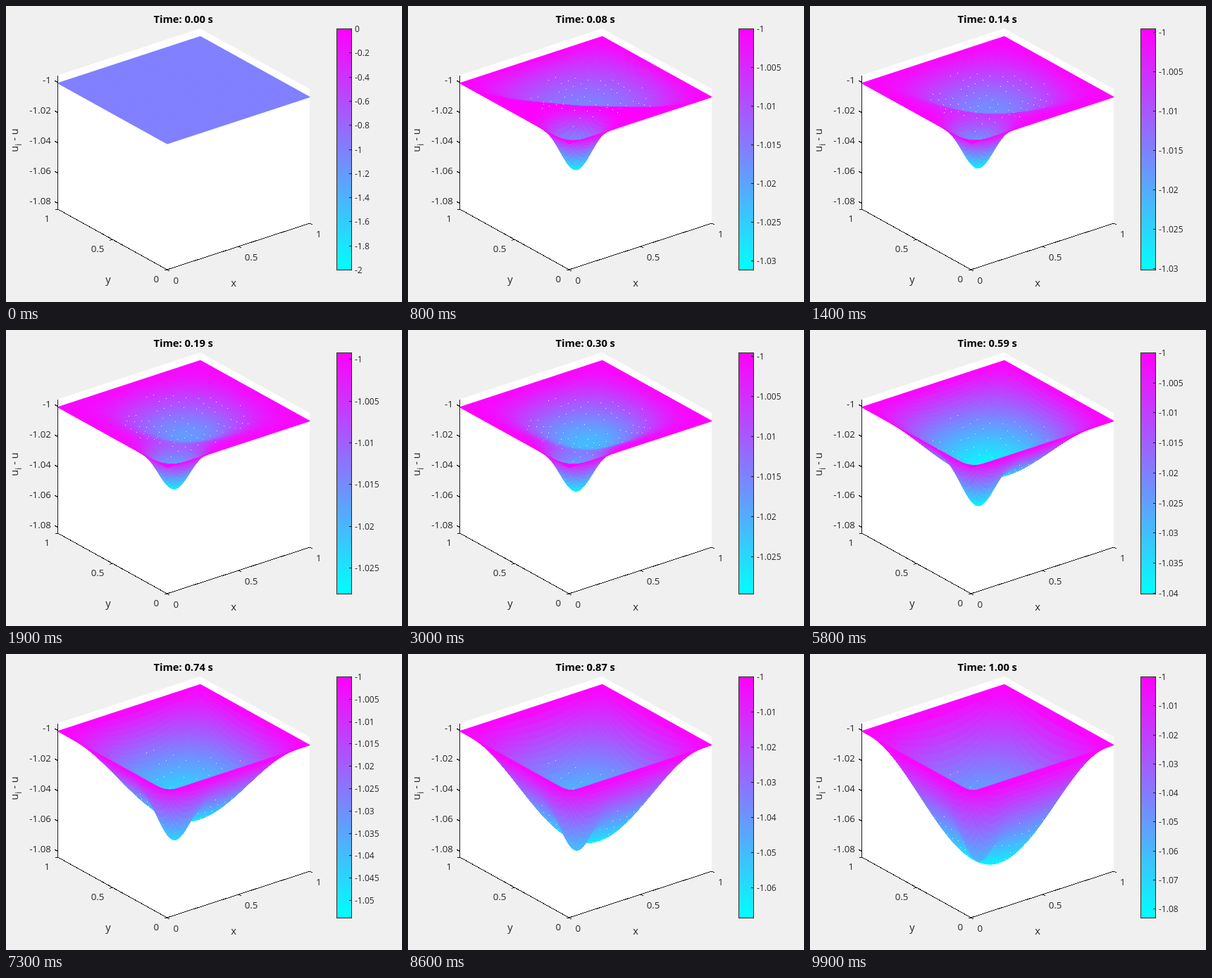
Recreate the animation shown at these times as an HTML page with a canvas. Size 562x421 px, loop 10 s.

```html
<!DOCTYPE html>
<html lang="en">
<head>
<meta charset="utf-8">
<title>Surface over time</title>
<style>
  html, body { margin: 0; width: 562px; height: 421px; overflow: hidden; background: #f0f0f0; }
  canvas, svg { position: absolute; left: 0; top: 0; }
  text { font: 13.33px "Open Sans", "Noto Sans", sans-serif; fill: #262626; }
  .label { font-size: 14.67px; }
  .title { font-size: 14.67px; font-weight: bold; fill: #000; }
  .bar text { font-size: 12px; }
  path, rect { shape-rendering: crispEdges; }
  path { stroke: #1a1a1a; fill: none; }
</style>
</head>
<body>
<canvas id="surface" width="562" height="421"></canvas>
<svg width="562" height="421" viewBox="0 0 562 421">
  <defs>
    <linearGradient id="cool" x1="0" y1="0" x2="0" y2="1">
      <stop offset="0" stop-color="#f0f"/><stop offset="1" stop-color="#0ff"/>
    </linearGradient>
  </defs>
  <text id="title" class="title" x="251.7" y="24" text-anchor="middle"></text>
  <g id="axes"></g>
  <text class="label" x="323" y="399" text-anchor="middle">x</text>
  <text class="label" x="145" y="394" text-anchor="middle">y</text>
  <text class="label" transform="translate(16.5 191) rotate(-90)" text-anchor="middle">u<tspan dy="5" font-size="11.7">i</tspan><tspan dy="-5"> - u</tspan></text>
  <rect x="469.5" y="32.5" width="21" height="343" fill="url(#cool)" stroke="#262626"/>
  <g id="bar" class="bar"></g>
</svg>
<script>
const FRAMES = 100, FRAME_MS = 100, CELLS = 60, Z_SCALE = 2150;
const BAR = { top: 32.5, height: 343, right: 490.5 };
const ctx = document.getElementById('surface').getContext('2d');
const title = document.getElementById('title');
const bar = document.getElementById('bar');

// time, pit depth, bowl depth, bowl sharpness, front cut-off, colour headroom
const KEYS = [
  [0, 0, 0, .8, 1, 0],
  [.02, .024, .006, .8, 1, 0],
  [.081, .0312, .0165, .8, 1, 0],
  [.192, .0263, .0168, 1.7, .1, .0008],
  [.434, .0265, .0275, 1.2, 0, 0],
  [.586, .027, .0401, .95, 0, 0],
  [.737, .0285, .0539, .92, 0, 0],
  [1, .031, .0831, .88, 0, 0]
];

function stateAt(t) {
  let k = 1;
  while (k < KEYS.length - 1 && KEYS[k][0] < t) k++;
  const a = KEYS[k - 1], b = KEYS[k], f = (t - a[0]) / (b[0] - a[0]);
  const [, pit, bowl, power, cut, headroom] = a.map((v, i) => v + (b[i] - v) * f);
  return { pit, bowl, power, cut, headroom };
}

const project = (x, y, depth) =>
  [228.8 + 202.4 * x - 155.4 * y, 196 - 66.5 * x - 86.2 * y + depth * Z_SCALE];

// Gaussian at 0.2 with a mirrored copy so that it vanishes on the edge
const pitProfile = v => Math.exp(-((v - .2) ** 2) / .015) - Math.exp(-((v + .2) ** 2) / .015);

function depthAt(x, y, s) {
  const wave = Math.max(0, Math.sin(Math.PI * x ** 1.08) * Math.sin(Math.PI * y ** 1.05));
  const behind = 1 / (1 + Math.exp((.84 - x - y) / .04));
  const bowl = s.bowl * wave ** s.power * (1 - s.cut * (1 - behind));
  return bowl + s.pit * pitProfile(x) * pitProfile(y);
}

function coolColor(f) {
  const r = Math.round(255 * Math.min(1, Math.max(0, f)));
  return `rgb(${r},${255 - r},255)`;
}

function polygon(points) {
  ctx.beginPath();
  points.forEach(p => ctx.lineTo(p[0], p[1]));
  ctx.closePath();
  ctx.fill();
}

function hasSpeck(i, j) {
  if (i % 3 || j % 3 || Math.hypot(i / CELLS - .5, j / CELLS - .5) > .36) return false;
  const h = Math.sin(i * 12.99 + j * 78.23) * 43758.5;
  return h - Math.floor(h) < .6;
}

function drawSurface(frame, grid, low, high) {
  ctx.clearRect(0, 0, 562, 421);
  ctx.fillStyle = '#fff';
  polygon([[275.5, 32], [73.5, 98.5], [73.5, 289], [228.5, 375], [431, 309], [431, 118]]);
  ctx.lineWidth = .9;
  ctx.lineJoin = 'round';
  for (let i = CELLS - 1; i >= 0; i--) {
    for (let j = CELLS - 1; j >= 0; j--) {
      const corners = [grid[i][j], grid[i + 1][j], grid[i + 1][j + 1], grid[i][j + 1]];
      const z = -1 - corners.reduce((sum, c) => sum + c.depth, 0) / 4;
      ctx.fillStyle = ctx.strokeStyle = coolColor((z - low) / (high - low));
      polygon(corners.map(c => c.point));
      ctx.stroke();
      if (frame && hasSpeck(i, j)) {
        const [x, y] = corners[2].point;
        ctx.fillStyle = '#f4f0ff';
        ctx.fillRect(Math.round(x), Math.round(y), 1, 1);
      }
    }
  }
}

function tickStep(range) {
  if (range > 1) return .2;
  if (range > .06) return .01;
  if (range > .022) return .005;
  return range > .011 ? .002 : .001;
}

function drawBar(low, high) {
  const step = tickStep(high - low);
  let out = '';
  for (let k = Math.floor(high / step + 1e-6); k * step >= low - 1e-6; k--) {
    const y = BAR.top + BAR.height * (high - k * step) / (high - low);
    const label = +(k * step).toFixed(4) || 0;
    out += `<path d="M${BAR.right - 4} ${y}h4"/><text x="495" y="${y + 4.5}">${label}</text>`;
  }
  bar.innerHTML = out;
}

function drawAxes() {
  let out = '<path d="M73.5 98.5V289L228.5 375L431.5 309"/>';
  const tick = (x, y, dx, dy) => out += `<path d="M${x} ${y}l${dx} ${dy}"/>`;
  const text = (x, y, s, anchor) =>
    out += `<text x="${x}" y="${y}" text-anchor="${anchor}">${s}</text>`;
  for (let k = 0; k < 5; k++) {
    tick(73.5, 108.5 + 43 * k, -4, -2);
    text(64, 110 + 43 * k, +(-1 - .02 * k).toFixed(2), 'end');
  }
  [0, .5, 1].forEach(v => {
    tick(228.5 + 203 * v, 375 - 66 * v, 3.5, 2);
    text(237.5 + 202.4 * v, 395 - 66 * v, v, 'start');
    tick(228.5 - 155 * v, 375 - 86 * v, -4, 1.3);
    text(217 - 155 * v, 392.5 - 86 * v, v, 'end');
  });
  document.getElementById('axes').innerHTML = out;
}

function render(frame) {
  const t = frame / (FRAMES - 1), state = stateAt(t);
  let deepest = 0;
  const grid = Array.from({ length: CELLS + 1 }, (_, i) =>
    Array.from({ length: CELLS + 1 }, (_, j) => {
      const x = i / CELLS, y = j / CELLS, depth = depthAt(x, y, state);
      deepest = Math.max(deepest, depth);
      return { depth, point: project(x, y, depth) };
    }));
  const low = frame ? -1 - deepest : -2;
  const high = frame ? -1 + state.headroom : 0;
  drawSurface(frame, grid, low, high);
  drawBar(low, high);
  title.textContent = `Time: ${t.toFixed(2)} s`;
}

let shown = -1;
const start = performance.now();
function loop() {
  const frame = Math.floor((performance.now() - start) / FRAME_MS) % FRAMES;
  if (frame !== shown) render(shown = frame);
  requestAnimationFrame(loop);
}
drawAxes();
loop();
</script>
</body>
</html>
```
